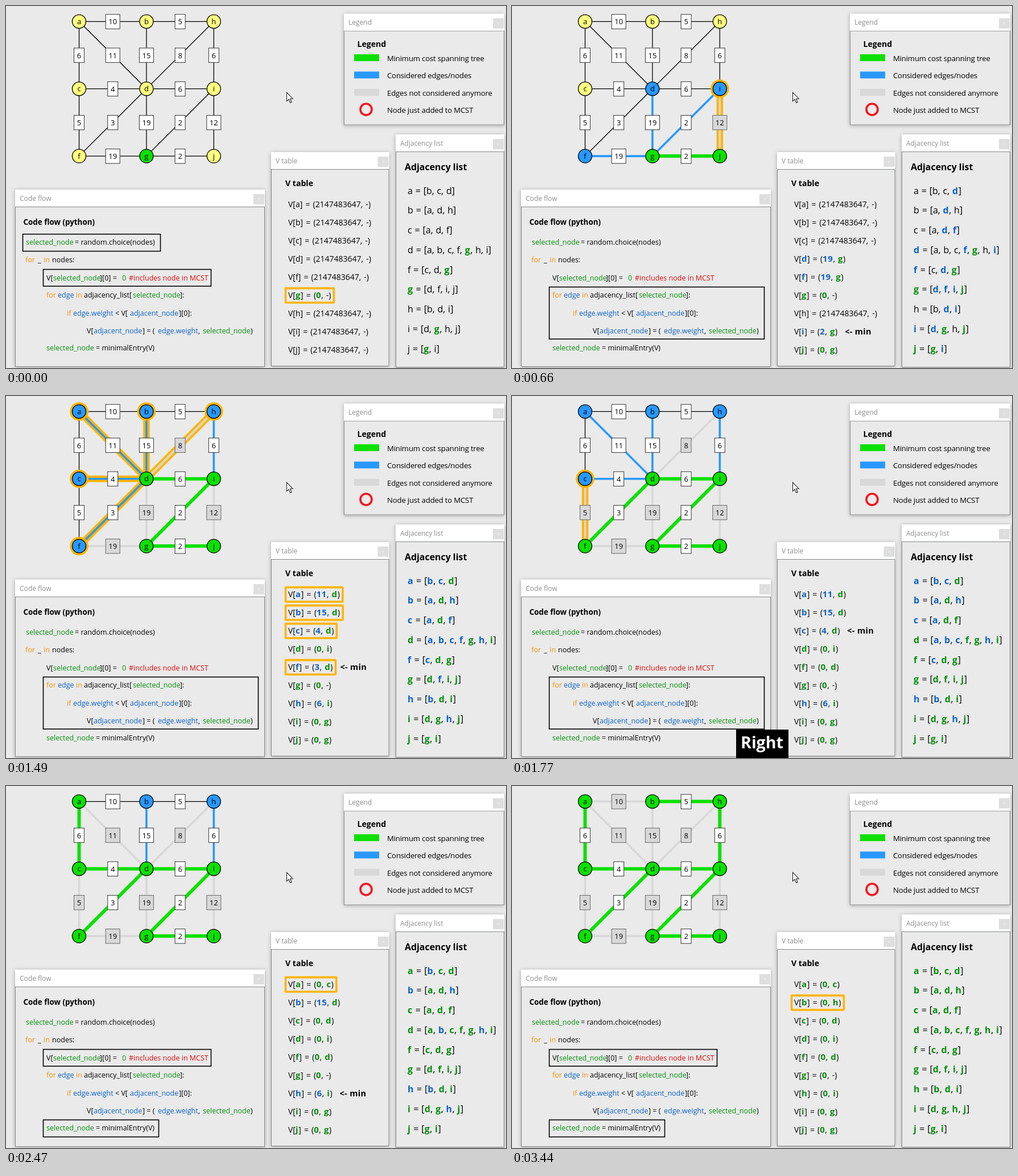
An HTML page for the animation above (3950 ms loop, 879 px wide and 637 px high).

```html
<!DOCTYPE html>
<html lang="en">
<head>
<meta charset="utf-8">
<title>Minimum cost spanning tree</title>
<style>
  html, body { margin: 0; width: 100%; height: 100%; overflow: hidden; background: #eaeaea; }
  svg { display: block; font-family: "Open Sans", "Noto Sans", sans-serif; }
  text { white-space: pre; }
  .title { font-size: 12px; fill: #8b8d8b; }
  .head { font-weight: 700; }
  .legend { font-size: 13.2px; letter-spacing: -.2px; }
  .code { font-size: 12.5px; }
  .row { font-size: 14px; word-spacing: 1.5px; }
  .row .on { font-size: 15px; }
  .list { font-size: 16px; word-spacing: .7px; }
  .on { font-weight: 700; letter-spacing: .6px; }
  .min { font-size: 14.5px; font-weight: 700; letter-spacing: .3px; }
  .mid { font-size: 13px; text-anchor: middle; }
  .box { fill: none; stroke: #000; stroke-width: 1.6; }
  .key { font-size: 28.6px; font-weight: 700; fill: #fff; }
</style>
</head>
<body>
<svg id="stage" width="879" height="637" viewBox="0 0 879 637">
  <defs>
    <filter id="shade" x="-10%" y="-10%" width="120%" height="120%">
      <feDropShadow dx="0" dy="1" stdDeviation="3.5" flood-color="#000" flood-opacity=".3"/>
    </filter>
  </defs>
  <g id="graph"></g>
  <g id="panels"></g>
  <g id="boxes"></g>
  <g id="table"></g>
  <g id="adjacency"></g>
  <path d="M493.5 152v15.5l3.5-3.3 2.7 6.1 2.5-1.1-2.7-6h4.7z" fill="#fff" stroke="#222" stroke-width="1.1"/>
  <g id="key">
    <rect x="394" y="587" width="92" height="50"/>
    <text class="key" x="402" y="620">Right</text>
  </g>
</svg>
<script>
const LOOP = 3950;
// Each entry moves on to the next algorithm phase.
const PHASES = [190, 370, 570, 750, 970, 1160, 1350, 1540, 1770, 1960, 2180, 2430, 2610, 2970, 3080, 3390];
// Times at which the key display switches on and off in turn.
const KEYS = [190, 320, 370, 520, 570, 660, 750, 780, 970, 1110, 1160, 1210, 1350, 1490, 1540, 1580,
  1770, 1910, 1960, 2000, 2180, 2340, 2430, 2470, 2560, 2790, 2880, 3020, 3080, 3300, 3390, 3440];

const NAMES = [...'abcdfghij'];
const GRID = ['abh', 'cdi', 'fgj'];
const ORDER = 'gjidfcahb';
const EDGES = 'ab10 ac6 ad11 bd15 bh5 cd4 cf5 df3 dg19 dh8 di6 fg19 gi2 gj2 hi6 ij12'
  .split(' ').map(s => ({ u: s[0], v: s[1], w: +s.slice(2) }));
const FAR = 2147483647;

const ORANGE = '#ffb400', GREY = '#d8d8d8', BLUE = '#2898ff', GREEN = '#0ce000';
const NODE = { idle: '#ffff80', seen: BLUE, tree: GREEN };
const INK = { idle: '#000', seen: '#0a62c4', tree: '#008f08' };
const LINE = { idle: ['#000', 1.3], seen: [BLUE, 3.6], tree: [GREEN, 6], out: [GREY, 3.6] };

const $ = id => document.getElementById(id);
const esc = s => String(s).replace(/</g, '&lt;');
const text = (cls, x, y, s, fill = '#000') =>
  `<text class="${cls}" x="${x}" y="${y}" fill="${fill}">${esc(s)}</text>`;
const rect = (x, y, w, h, rest) =>
  `<rect x="${x}" y="${y}" width="${w}" height="${h}" ${rest}/>`;
const ink = (s, kind) => kind === 'idle' ? s : `<tspan class="on" fill="${INK[kind]}">${s}</tspan>`;

const place = {};
GRID.forEach((row, r) => [...row].forEach((n, c) => {
  place[n] = [128.5 + 118.4 * c, 27.3 + 118.4 * r];
}));
const edgeOf = (p, q) => EDGES.findIndex(e => e.u + e.v === p + q || e.v + e.u === p + q);
const neighbours = n => NAMES.filter(m => edgeOf(n, m) >= 0);

// Runs the algorithm and keeps a snapshot of every phase.
function solve() {
  const kind = {}, cost = {}, from = {}, edge = EDGES.map(() => 'idle'), out = [];
  NAMES.forEach(n => { kind[n] = 'idle'; cost[n] = FAR; from[n] = '-'; });
  const snap = more => out.push({
    kind: { ...kind }, cost: { ...cost }, from: { ...from }, edge: [...edge], near: [], ...more
  });
  [...ORDER].forEach((n, k) => {
    kind[n] = 'tree';
    cost[n] = 0;
    if (k) edge[edgeOf(n, from[n])] = 'tree';
    const open = NAMES.filter(m => kind[m] === 'seen').sort((p, q) => cost[p] - cost[q]);
    snap({ now: n, boxes: k ? ['value', 'pick'] : ['start', 'value'], marked: [n], min: open[0] });
    if (k === ORDER.length - 1) return;
    const near = neighbours(n).filter(m => kind[m] !== 'tree'), marked = [];
    near.forEach(m => {
      const e = edgeOf(n, m);
      if (EDGES[e].w >= cost[m]) { edge[e] = 'out'; return; }
      if (from[m] !== '-') edge[edgeOf(m, from[m])] = 'out';
      kind[m] = edge[e] = 'seen';
      cost[m] = EDGES[e].w;
      from[m] = n;
      marked.push(m);
    });
    snap({ now: n, boxes: ['loop'], marked, near, min: ORDER[k + 1] });
  });
  return out;
}

function panel(x, y, w, h, title) {
  return `<g filter="url(#shade)">${rect(x, y, w, h, 'fill="#eaeaea"')}</g>`
    + rect(x + .5, y + 30.5, w - 1, h - 31, 'fill="#eaeaea" stroke="#85878a"')
    + rect(x, y, w, 30, 'fill="#fff"')
    + rect(x + w - 20, y + 8, 19, 18, 'fill="#dedede"')
    + `<path d="M${x + w - 12.5} ${y + 15}l4 4m0-4l-4 4" stroke="#eee"/>`
    + text('title', x + 8, y + 19.5, title, '#8b8d8b');
}

function drawPanels() {
  const K = '#f29100', G = INK.tree, B = INK.seen, R = '#d60c0c', N = '#000';
  const code = [
    [420, [35, 'selected_node', G], [121, '= random.choice(nodes)', N]],
    [451, [34, 'for', K], [56, '_', N], [66, 'in', K], [81, 'nodes:', N]],
    [483, [71, 'V[', N], [83, 'selected_node', G], [165, '][0] =', N], [204, '0', G],
      [216, '#includes node in MCST', R]],
    [513, [71, 'for', K], [91, 'edge', B], [123, 'in', K], [137, 'adjacency_list[', N],
      [223, 'selected_node', G], [306, ']:', N]],
    [545, [107, 'if', K], [118, 'edge.weight', B], [192, '< V[', N], [218, 'adjacent_node', B],
      [304, '][0]:', N]],
    [576, [142, 'V[', N], [154, 'adjacent_node', B], [240, '] = (', N], [267, 'edge.weight', B],
      [338, ',', N], [346, 'selected_node', G], [430, ')', N]],
    [606, [71, 'selected_node', G], [158, '= minimalEntry(V)', N]]
  ];
  const legend = ['Minimum cost spanning tree', 'Considered edges/nodes',
    'Edges not considered anymore', 'Node just added to MCST'];
  const head = (x, y, size, s) => `<g font-size="${size}">${text('head', x, y, s)}</g>`;
  $('panels').innerHTML =
    panel(594, 13.5, 282, 196, 'Legend') + panel(16, 323, 439, 312, 'Code flow')
    + panel(466, 257, 207.5, 377, 'V table') + panel(685, 226, 191, 410, 'Adjacency list')
    + head(617.5, 72, 14.1, 'Legend') + head(30.5, 385, 13.4, 'Code flow (python)')
    + head(491, 316.5, 14.1, 'V table') + head(701, 289, 15.9, 'Adjacency list')
    + [GREEN, BLUE, GREY].map((c, i) => rect(612, 85 + 30.4 * i, 44, 12, `fill="${c}"`)).join('')
    + '<circle cx="633" cy="182" r="10" fill="none" stroke="#f5141e" stroke-width="3.6"/>'
    + legend.map((s, i) => text('legend', 670, 97 + 30.4 * i, s)).join('')
    + code.map(([y, ...parts]) => parts.map(([x, s, c]) => text('code', x, y, s, c)).join('')).join('');
}

function drawGraph(s) {
  let halos = '', lines = '', labels = '', nodes = '';
  EDGES.forEach(({ u, v, w }, i) => {
    const [x1, y1] = place[u], [x2, y2] = place[v], kind = s.edge[i];
    const line = (c, n) => `<path d="M${x1} ${y1}L${x2} ${y2}" stroke="${c}" stroke-width="${n}"/>`;
    const other = u === s.now ? v : v === s.now ? u : '';
    if (s.near.includes(other)) halos += line(ORANGE, 11.5);
    lines += line(...LINE[kind]);
    const mx = (x1 + x2) / 2, my = (y1 + y2) / 2, bw = w > 9 ? 25 : 18;
    labels += rect(mx - bw / 2, my - 12.5, bw, 25.4,
      kind === 'out' ? `fill="${GREY}" stroke="#666"` : 'fill="#fff" stroke="#333"')
      + text('mid', mx, my + 5, w);
  });
  NAMES.forEach(n => {
    const [x, y] = place[n];
    if (s.near.includes(n)) nodes += `<circle cx="${x}" cy="${y}" r="16.3" fill="${ORANGE}"/>`;
    nodes += `<circle cx="${x}" cy="${y}" r="12" fill="${NODE[s.kind[n]]}" stroke="#000" stroke-width="1.3"/>`
      + text('mid', x, y + 4.7, n);
  });
  $('graph').innerHTML = halos + lines + labels + nodes;
}

function drawTable(s) {
  const mid = i => 349.3 + 32 * i;
  $('table').innerHTML = NAMES.map((n, i) => {
    const kind = s.kind[n], p = s.from[n];
    return `<text class="row" x="496" y="${mid(i) + 5}">V[${ink(n, kind)}] = (${ink(s.cost[n], kind)}, `
      + `${ink(p, p === '-' ? 'idle' : 'tree')})</text>`;
  }).join('');
  const rows = [...$('table').children];
  let extra = '';
  NAMES.forEach((n, i) => {
    const end = 496 + rows[i].getComputedTextLength();
    if (s.marked.includes(n)) {
      extra += rect(491.5, mid(i) - 12.7, end + 5 - 491.5, 25.4,
        `rx="1" fill="none" stroke="${ORANGE}" stroke-width="3.6"`);
    }
    if (n === s.min) extra += text('min', end + 13, mid(i) + 5, '<- min');
  });
  $('table').insertAdjacentHTML('beforeend', extra);
}

function drawLists(s) {
  const name = n => ink(n, s.kind[n]);
  $('adjacency').innerHTML = NAMES.map((n, i) =>
    `<text class="list" x="706" y="${330.5 + 34.75 * i}">${name(n)} = [`
    + neighbours(n).map(name).join(', ') + ']</text>').join('');
}

const BOXES = {
  start: [29.5, 401.5, 242, 30], value: [65.5, 463.5, 295, 29.5],
  loop: [65.5, 494.5, 378, 91.5], pick: [65.5, 587.5, 203, 30]
};
const states = solve();
let shown = -1;

function show(i) {
  if (i === shown) return;
  shown = i;
  const s = states[i];
  drawGraph(s);
  drawTable(s);
  drawLists(s);
  $('boxes').innerHTML = s.boxes.map(b => rect(...BOXES[b], 'class="box"')).join('');
}

const passed = (times, t) => times.filter(x => x <= t).length;
const start = performance.now();

function tick() {
  const t = (performance.now() - start) % LOOP;
  show(passed(PHASES, t));
  $('key').style.display = passed(KEYS, t) % 2 ? '' : 'none';
  requestAnimationFrame(tick);
}

drawPanels();
tick();
</script>
</body>
</html>
```
